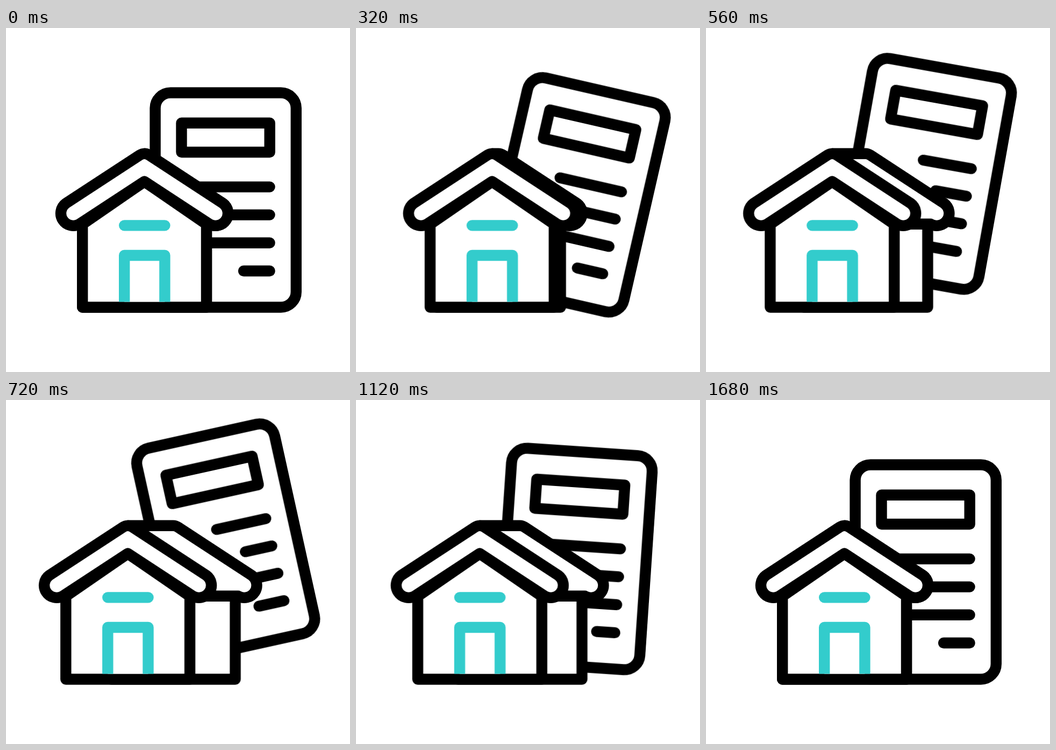
Recreate the animation shown at these times as an HTML page without scripts. Size 640 px wide and 640 px high, loop 1760 ms.

```html
<!DOCTYPE html>
<html lang="en">
<head>
<meta charset="utf-8">
<title>House and calculator</title>
<style>
  html, body { margin: 0; width: 100%; height: 100%; overflow: hidden; background: #fff; }
  svg { display: block; width: 100%; height: 100%; }
  path, rect {
    fill: #fff; stroke: #000; stroke-width: 20.4;
    stroke-linecap: round; stroke-linejoin: round;
  }
  .accent { stroke: #3cc; }
  .door { stroke-linecap: butt; }

  .lift, .tilt, .row, .slide, .panel {
    animation: 1760ms cubic-bezier(.5, 0, .5, 1) infinite both;
  }
  .lift { animation-name: lift; }
  .tilt { animation-name: tilt; transform-origin: 408.7px 320px; }
  .slide { animation-name: slide; }
  .panel { animation-name: stretch; }
  .front { --shift: -32.5px; }
  .back { --shift: 56.3px; }

  /* Each row shortens towards its right end, one after another. */
  .row {
    fill: none;
    animation-name: shorten;
    animation-delay: calc(var(--i) * 170ms);
    stroke-dasharray: var(--full) 400px;
  }

  @keyframes lift {
    0%, 7.7% { transform: translateY(0); }
    42.3%, 44.3% { transform: translateY(-58px); }
    80.1%, 100% { transform: translateY(0); }
  }
  @keyframes tilt {
    0%, 5.7% { transform: rotate(0deg); }
    25.6% { transform: rotate(17.4deg); }
    43.2% { transform: rotate(-13.2deg); }
    63.6% { transform: rotate(3.85deg); }
    79.5%, 100% { transform: rotate(0deg); }
  }
  @keyframes shorten {
    0%, 6.8% { stroke-dasharray: var(--full) 400px; }
    35.2% { stroke-dasharray: var(--short) 400px; }
    59.1%, 100% { stroke-dasharray: var(--full) 400px; }
  }
  @keyframes slide {
    0%, 6.7% { transform: translateX(0); }
    48.3%, 50.9% { transform: translateX(var(--shift)); }
    93.8%, 100% { transform: translateX(0); }
  }
  @keyframes stretch {
    0%, 6.7%, 93.8%, 100% {
      d: path("M257.5 233.7 H257.5 A16 16 0 0 1 266.3 236.5 L403.6 326.3 A23 23 0 0 1 378.4 364.7 H378.4 Z");
    }
    48.3%, 50.9% {
      d: path("M225 233.7 H313.8 A16 16 0 0 1 322.6 236.5 L459.9 326.3 A23 23 0 0 1 434.7 364.7 H345.9 Z");
    }
  }
</style>
</head>
<body>
<svg viewBox="0 0 640 640">
  <g class="lift">
    <g class="tilt">
      <rect x="277.6" y="120.5" width="262.2" height="399" rx="28.5"/>
      <rect x="326.5" y="176.8" width="164.2" height="54.2"/>
      <path class="row" style="--i: 0; --full: 130px; --short: 90px" d="M490.6 295.6 h-160"/>
      <path class="row" style="--i: 1; --full: 70px; --short: 50px" d="M490.6 347.6 h-160"/>
      <path class="row" style="--i: 2; --full: 112px; --short: 78px" d="M490.6 399.7 h-160"/>
      <path class="row" style="--i: 3; --full: 48.5px; --short: 34px" d="M490.6 452 h-160"/>
    </g>
  </g>

  <path class="slide back" d="M142.2 365 V519.5 H373 V365"/>
  <path class="panel" d="M257.5 233.7 H257.5 A16 16 0 0 1 266.3 236.5 L403.6 326.3 A23 23 0 0 1 378.4 364.7 H378.4 Z"/>

  <g class="slide front">
    <path d="M142.2 365 V519.5 H373 V365 L257.5 285.6 Z"/>
    <path class="accent" d="M220.2 367.4 H295.4"/>
    <path class="accent door" d="M220.2 509.4 V423 H295.4 V509.4"/>
    <path d="M111.4 326.3 L248.7 236.5 A16 16 0 0 1 266.3 236.5 L403.6 326.3 A23 23 0 0 1 378.4 364.7 L257.5 285.6 L136.6 364.7 A23 23 0 0 1 111.4 326.3 Z"/>
  </g>
</svg>
</body>
</html>
```
